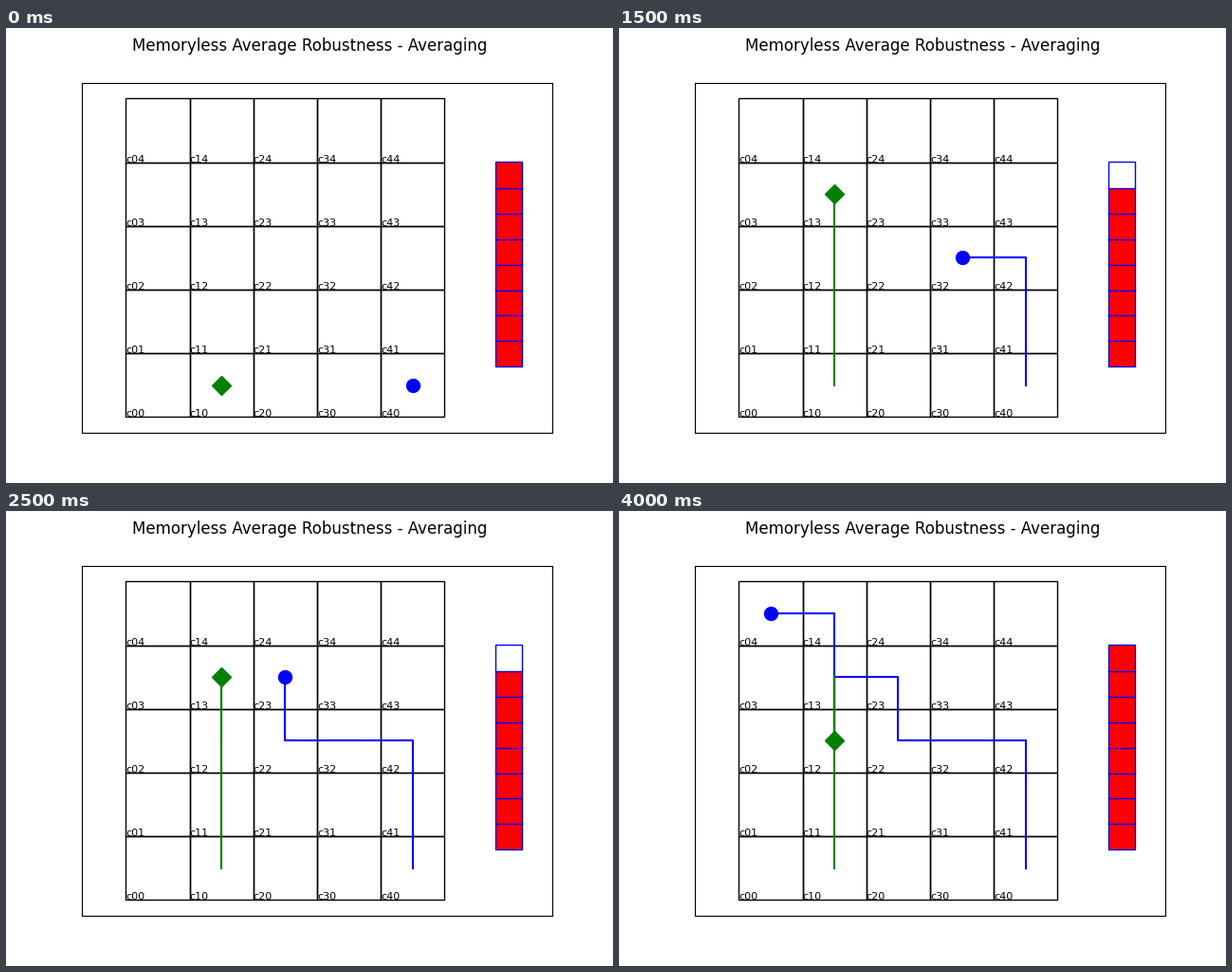
These frames come from a looping animation (640x480 px, 4500 ms). A matplotlib script:

```python
import matplotlib.pyplot as plt
from matplotlib.animation import FuncAnimation
from matplotlib.patches import Rectangle

STEP_MS = 500
SIZE = 5
CELLS = 8

# Grid cell (column, row) of each agent, and the bar level, at every step
BLUE = [(4, 0), (4, 1), (4, 2), (3, 2), (2, 2), (2, 3), (1, 3), (1, 4), (0, 4)]
GREEN = [(1, row) for row in (0, 1, 2, 3, 2, 3, 2, 3, 2)]
LEVELS = [8, 0, 8, 7, 8, 7, 8, 7, 8]

fig, ax = plt.subplots(figsize=(6.4, 4.8), dpi=100)
fig.suptitle("Memoryless Average Robustness - Averaging", fontsize=12)

# Equal scale on both axes, centred on column 3
half_y = SIZE * 1.1 / 2
half_x = half_y * 496 / 369.6
ax.set_xlim(3 - half_x, 3 + half_x)
ax.set_ylim(SIZE / 2 - half_y, SIZE / 2 + half_y)
ax.set_xticks([])
ax.set_yticks([])

for col in range(SIZE):
    for row in range(SIZE):
        ax.add_patch(Rectangle((col, row), 1, 1, fill=False, lw=1))
        ax.text(col, row, f"c{col}{row}", fontsize=8)

bar = [
    ax.plot(6, 1 + 0.4 * i, "s", ms=20, mec="blue", mfc="white")[0]
    for i in range(CELLS)
]


def make_agent(color, marker):
    trail, = ax.plot([], [], color=color, lw=1.5)
    head, = ax.plot([], [], marker, color=color, ms=10)
    return trail, head


blue = make_agent("blue", "o")
green = make_agent("green", "D")


def move(agent, path, step):
    trail, head = agent
    xs = [col + 0.5 for col, _ in path[:step + 1]]
    ys = [row + 0.5 for _, row in path[:step + 1]]
    trail.set_data(xs, ys)
    head.set_data(xs[-1:], ys[-1:])


def update(step):
    move(blue, BLUE, step)
    move(green, GREEN, step)
    for i, cell in enumerate(bar):
        cell.set_markerfacecolor("red" if i < LEVELS[step] else "white")
    return [*bar, *blue, *green]


anim = FuncAnimation(fig, update, frames=len(BLUE), interval=STEP_MS,
                     repeat=True, repeat_delay=0)
plt.show()
```
